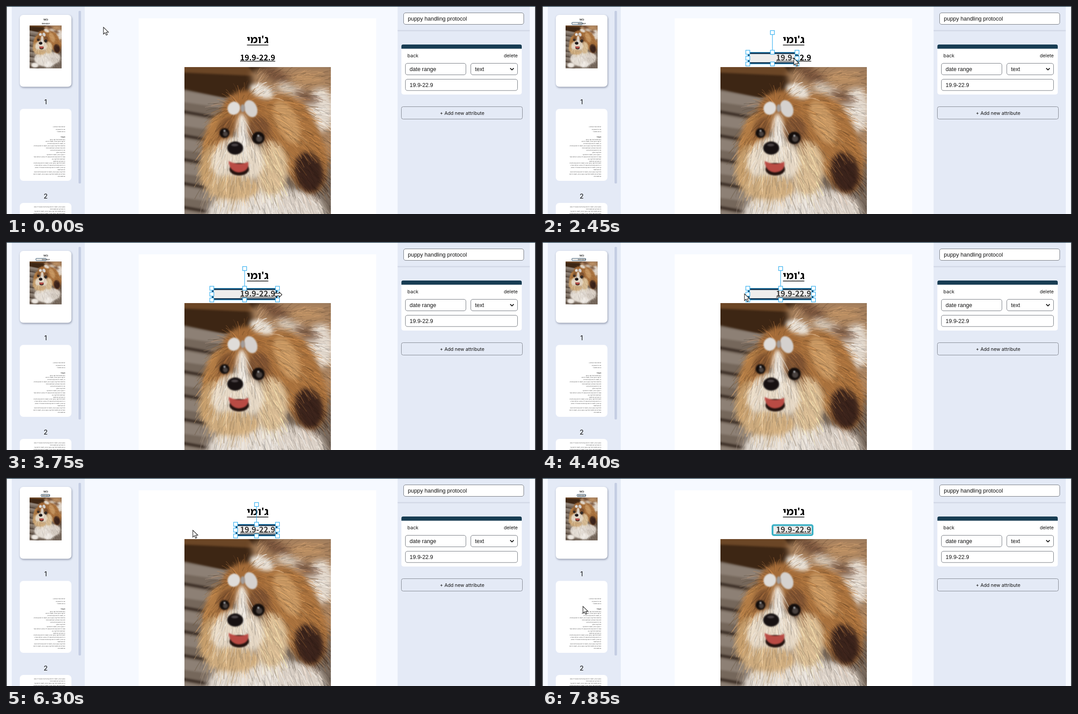
These frames come from a looping animation (1191 px wide and 470 px high, 8000 ms). An HTML page with a canvas:

```html
<!DOCTYPE html>
<html lang="en">
<head>
<meta charset="utf-8">
<title>Attribute box editing</title>
<style>
html, body { margin: 0; width: 1191px; height: 470px; overflow: hidden; background: #f6f9ff; }
body { position: relative; }
svg, canvas { position: absolute; left: 0; top: 0; }
#photo { left: 401px; top: 138px; }
#mini { left: 53px; top: 44px; width: 72px; height: 97px; }
.field { fill: #fff; stroke: #70757d; stroke-width: 1; }
.input { font: 12.5px "Liberation Sans", Arial, sans-serif; fill: #111; }
.label { font: 10.7px Inter, sans-serif; fill: #111; }
.num { font: 15px Inter, sans-serif; fill: #111; text-anchor: middle; }
.name { font: bold 24px "Open Sans", "Noto Sans Hebrew", sans-serif; text-anchor: middle; }
.range { font: bold 17.3px "Noto Sans CJK JP", "Noto Sans CJK SC", "Open Sans", sans-serif; text-anchor: middle; }
.tiny { font: 2.9px "Open Sans", "Noto Sans Hebrew", "DejaVu Sans", sans-serif; fill: #333; direction: rtl; }
.heading { font-size: 4px; font-weight: bold; }
.card { fill: #fff; }
.lift { filter: drop-shadow(1px 2px 2px rgba(40, 50, 80, .45)); }
.grip { fill: #fff; stroke: #35b0f0; stroke-width: 1.3; }
</style>
</head>
<body>
<svg width="1191" height="470">
  <rect x="13" width="164" height="470" fill="#e4eaf6"/>
  <rect x="163" y="11" width="5.500" height="390" rx="2" fill="#c4cde3"/>
  <rect x="880" width="297" height="470" fill="#e4eaf6"/>
  <rect x="880" y="54.500" width="297" height="1.500" fill="#cdd4e3"/>
  <rect x="880" y="56" width="297" height="2" fill="#dce2ef"/>
  <rect x="298" y="28" width="534" height="442" fill="#fff"/>

  <rect class="card lift" x="31" y="20" width="116" height="162.500" rx="8"/>
  <rect class="card" x="31" y="232.500" width="116" height="162.500" rx="8"/>
  <rect class="card" x="31" y="445" width="116" height="162.500" rx="8"/>
  <text class="num" x="89" y="221.500">1</text>
  <text class="num" x="89" y="434.500">2</text>
  <g id="lines"></g>

  <g id="head">
    <text class="name" x="565.500" y="84">ג'ומי</text>
    <rect x="541.500" y="87.500" width="48" height="1.500"/>
    <text class="range" x="565.500" y="123">19.9-22.9</text>
    <rect x="526" y="124" width="79" height="1.300"/>
  </g>
  <use href="#head" transform="translate(31 20) scale(.2172) translate(-298 -28)"/>

  <rect class="field" x="893.500" y="15.500" width="270" height="26" rx="4.500"/>
  <text class="input" x="903" y="33">puppy handling protocol</text>
  <rect x="888.500" y="87" width="270.500" height="113" rx="5" fill="#fff"/>
  <path d="M888.500 96.500v-5.500q0-4 4-4h262.500q4 0 4 4v5.500z" fill="#173c53"/>
  <text class="label" x="902" y="115.500">back</text>
  <text class="label" x="1150" y="115.500" text-anchor="end">delete</text>
  <rect class="field" x="897.500" y="129.500" width="136" height="26" rx="4.500"/>
  <text class="input" x="907" y="147">date range</text>
  <rect class="field" x="1044.500" y="129.500" width="105" height="26" rx="4.500"/>
  <text class="input" x="1054" y="147">text</text>
  <path d="M1133 140.500l4 4 4-4" fill="none" stroke="#111" stroke-width="1.800"/>
  <rect class="field" x="897.500" y="165.500" width="252" height="25.500" rx="4.500"/>
  <text class="input" x="907" y="182.500">19.9-22.9</text>
  <rect x="888.500" y="227.500" width="272" height="28" rx="4" fill="none" stroke="#80858f"/>
  <text class="label" x="1025" y="245.500" text-anchor="middle">+ Add new attribute</text>

  <path d="M0 .75H1191" stroke="#1d3442" stroke-width="1.500"/>
  <path d="M.75 0V470M1190 0V470" stroke="#2e3135" stroke-width="2"/>
</svg>

<canvas id="photo" width="329" height="443"></canvas>
<canvas id="mini" width="72" height="97"></canvas>

<svg width="1191" height="470">
  <g id="copy" transform="translate(31 20) scale(.2172) translate(-298 -28)">
    <rect rx="4" fill="#c0bebc" fill-opacity=".28" stroke="#143a58" stroke-width="4"/>
  </g>
  <rect id="box" rx="3" fill="#c0bebc" fill-opacity=".28" stroke-width="4"/>
  <g id="frame">
    <path id="wire" fill="none" stroke="#35b0f0" stroke-width="1.200"/>
  </g>
  <path id="arrow" d="M0 0V15.500l3.600-3.400 2.600 5.800 2.600-1.100-2.500-5.600h5z" fill="#fff" stroke="#111" stroke-width="1.100"/>
  <path id="sizer" d="M-9 0l6-6v3.500h6V-6l6 6-6 6V2.500h-6V6z" fill="#fff" stroke="#111" stroke-width="1.200"/>
</svg>

<script>
const $ = id => document.getElementById(id);
const NS = 'http://www.w3.org/2000/svg';
const set = (el, attrs) => { for (const k in attrs) el.setAttribute(k, attrs[k]); };
const add = (parent, tag, attrs) => {
  const el = parent.appendChild(document.createElementNS(NS, tag));
  set(el, attrs);
  return el;
};
const clamp = (v, lo, hi) => Math.min(hi, Math.max(lo, v));

let seed = 7;
const rnd = () => (seed = seed * 16807 % 2147483647) / 2147483647;

// Unreadably small page text: long lines mixed with short ones
const prose = 'יש לתת אוכל פעמיים ביום ולצאת לטיול קצר בבוקר ובערב, לשמור על מים נקיים ולהניח צעצוע ליד המיטה. ';
function write(y, chars, style = '') {
  const from = Math.floor(rnd() * 60);
  const text = add($('lines'), 'text', { class: 'tiny ' + style, x: 133, y });
  text.textContent = prose.repeat(2).slice(from).trim().slice(0, chars);
}
function fill(from, to) {
  for (let y = from; y < to; y += 4.9) write(y, rnd() < .6 ? 53 : 12 + 30 * rnd());
}
for (let i = 0; i < 3; i++) write(274 + i * 5.5, 20 - i * 3);
write(296.7, 5, 'heading');
fill(302.5, 388);
fill(455, 470);

// Soft picture of a puppy on a wooden deck, in stage coordinates
function paint(ctx) {
  ctx.translate(-401, -138);
  const blur = px => { ctx.filter = px ? `blur(${px}px)` : 'none'; };
  const shape = (color, d) => {
    ctx.fillStyle = color;
    ctx.fill(new Path2D(d));
  };
  const oval = (color, x, y, rx, ry = rx, turn = 0) => {
    ctx.fillStyle = color;
    ctx.beginPath();
    ctx.ellipse(x, y, rx, ry, turn, 0, 7);
    ctx.fill();
  };

  shape('#75675b', 'M401 138h329v443H401z');
  blur(2);
  shape('#3d2614', 'M390 130h220v60L490 208 390 186z');
  shape('#6b4626', 'M390 130h150l20 28-170-8z');
  for (let y = 190; y < 580; y += 54) {
    shape('#8d8075', `M390 ${y}l110 20v22l-110-16z`);
    shape('#3a2d25', `M390 ${y + 44}l110 20v6l-110-20z`);
  }

  // back and ruff
  blur(7);
  shape('#a9825e', 'M550 150Q640 120 740 138V350H590z');
  oval('#e3d9ce', 705, 235, 30, 50);
  oval('#75513a', 610, 160, 40, 13, .5);
  oval('#ddd0c0', 640, 190, 34, 12, .4);
  oval('#75513a', 672, 205, 30, 9, .5);
  oval('#bb8f63', 672, 165, 40, 12);

  // chest and paws
  oval('#e6ded5', 570, 480, 120, 80);
  oval('#d9cfc5', 660, 470, 55, 55);
  oval('#efe9e2', 456, 546, 36, 26);
  oval('#efe9e2', 592, 538, 44, 30);

  // head, ears and face
  blur(5);
  oval('#a46c39', 545, 240, 60, 50);
  oval('#b27c45', 475, 300, 30, 62, .25);
  shape('#a8713d', 'M580 208C645 180 690 235 708 295C735 360 724 424 682 424C642 408 640 370 600 350Q570 270 580 208z');
  oval('#c79762', 630, 262, 24, 52, -.4);
  oval('#3a231b', 680, 375, 32, 46, -.2);
  oval('#c49d6c', 462, 360, 26, 50, .2);
  oval('#d9bc94', 596, 365, 36, 62);
  oval('#e6d8c5', 520, 350, 58, 56);
  oval('#cdab7e', 510, 410, 60, 28);
  oval('#80532f', 494, 275, 17, 26, .3);
  oval('#7b5030', 568, 278, 24, 30);
  oval('#ece4da', 530, 285, 13, 42);
  oval('#e9e1d6', 574, 193, 28, 14, .4);

  // every hair takes its tone from below and flows outwards and down
  blur(0);
  const { data } = ctx.getImageData(0, 0, 329, 443);
  ctx.globalAlpha = .45;
  for (let i = 0; i < 3200; i++) {
    const x = 435 + 295 * rnd(), y = 150 + 420 * rnd();
    if (x < 560 && Math.hypot((x - 545) / 110, (y - 360) / 172) > 1) continue;
    const p = (Math.floor(y - 138) * 329 + Math.floor(x - 401)) * 4;
    const tone = .62 + .72 * rnd(), len = 10 + 24 * rnd();
    const dir = Math.atan2(y - 290 + 60, x - 525) + (rnd() - .5) * .7;
    const dx = len * Math.cos(dir), dy = len * Math.sin(dir);
    ctx.strokeStyle = `rgb(${[0, 1, 2].map(c => Math.min(255, data[p + c] * tone))})`;
    ctx.lineWidth = .6 + 1.5 * rnd();
    ctx.beginPath();
    ctx.moveTo(x, y);
    ctx.quadraticCurveTo(x + dx / 2, y + dy / 2, x + dx, y + dy + len * .25);
    ctx.stroke();
  }
  ctx.globalAlpha = 1;

  // bow, eyes, nose and mouth
  blur(1.5);
  oval('#dfdcd9', 512, 231, 14, 15, .4);
  oval('#d5d1ce', 550, 232, 14, 20, -.4);
  oval('#a29c99', 532, 231, 5, 9);
  for (const [x, y, r] of [[491, 287, 11], [567, 298, 14]]) {
    oval('#130d0b', x, y, r);
    oval('#4a423f', x + 2, y + 2, r / 2);
    oval('#e8edf2', x, y - 5, 2);
  }
  oval('#171112', 515, 321, 18, 15);
  oval('#4c4547', 514, 314, 8, 3);
  oval('#24130f', 524, 369, 22, 14);
  shape('#b94b44', 'M500 350Q523 362 544 352Q548 374 523 376Q502 374 500 350z');
}
paint($('photo').getContext('2d'));
const small = $('mini').getContext('2d');
small.imageSmoothingQuality = 'high';
small.drawImage($('photo'), 0, 0, 72, 97);

// Pointer moves: start, end, x, y, ease-out power
const START = [219, 48];
const moves = [
  [0, 550, 464, 106],
  [800, 1250, 573, 130],
  [1450, 1650, 503, 112],
  [2300, 2500, 575, 119],
  [2900, 3250, 635, 119],
  [3250, 3750, 611, 119],
  [3800, 4400, 455, 117],
  [4400, 4600, 595, 117],
  [4650, 5000, 461, 119],
  [5150, 5750, 522, 122, 1],
  [6100, 6500, 364, 116],
  [6600, 7200, 74, 35],
  [7350, 7850, 92, 290],
];

function pointer(t) {
  let [x, y] = START;
  for (const [from, to, tx, ty, power = 1.5] of moves) {
    const p = 1 - (1 - clamp((t - from) / (to - from), 0, 1)) ** power;
    x += (tx - x) * p;
    y += (ty - y) * p;
  }
  return { x, y };
}

// The box edges follow the pointer while it drags them
const TOP = 104.5, LEFT = 462.5;
function edges(t) {
  const drawn = pointer(clamp(t, 850, 1250));
  return {
    l: t < 5150 ? LEFT : Math.max(LEFT, pointer(Math.min(t, 5750)).x - 6),
    r: t < 2950 ? drawn.x : pointer(Math.min(t, 3750)).x - 1,
    b: drawn.y + 1,
  };
}
function fit(rect, { l, r, b }) {
  set(rect, { x: l + 2, y: TOP + 2, width: Math.max(0, r - l - 4), height: Math.max(0, b - TOP - 4) });
}

const within = (t, ...spans) => spans.some(([a, b]) => t >= a && t < b);
const show = (el, on) => { el.style.display = on ? '' : 'none'; };
const grips = Array.from({ length: 9 }, () => add($('frame'), 'rect', { class: 'grip', width: 9, height: 9 }));

function draw(t) {
  const picked = within(t, [1500, 1650], [2100, 6650]);
  const sizing = within(t, [2550, 3850], [4950, 6150]);
  const box = edges(t), { l, r, b } = box;
  const mx = (l + r) / 2, my = (TOP + b) / 2;
  fit($('box'), box);
  show($('box'), t >= 850);
  set($('box'), { stroke: picked ? '#143a58' : '#3cb1c5' });

  show($('frame'), picked);
  set($('wire'), { d: `M${l} ${TOP}H${r}V${b}H${l}ZM${mx} ${TOP}V60` });
  const spots = [l, mx, r].flatMap(x => [TOP, my, b].map(y => [x, y]));
  spots[4] = [mx, 60];
  grips.forEach((g, i) => set(g, { x: spots[i][0] - 4.5, y: spots[i][1] - 4.5 }));

  // the thumbnail only follows when the mouse is released
  const saved = [6000, 3850, 1250].find(s => s <= t);
  show($('copy'), saved);
  if (saved) fit($('copy').firstElementChild, edges(saved));

  const { x, y } = pointer(t);
  show($('arrow'), !sizing);
  show($('sizer'), sizing);
  set($(sizing ? 'sizer' : 'arrow'), { transform: `translate(${x} ${y})` });
}

function tick() {
  draw(Math.floor(performance.now() % 8000 / 50) * 50);
  requestAnimationFrame(tick);
}
tick();
</script>
</body>
</html>
```
